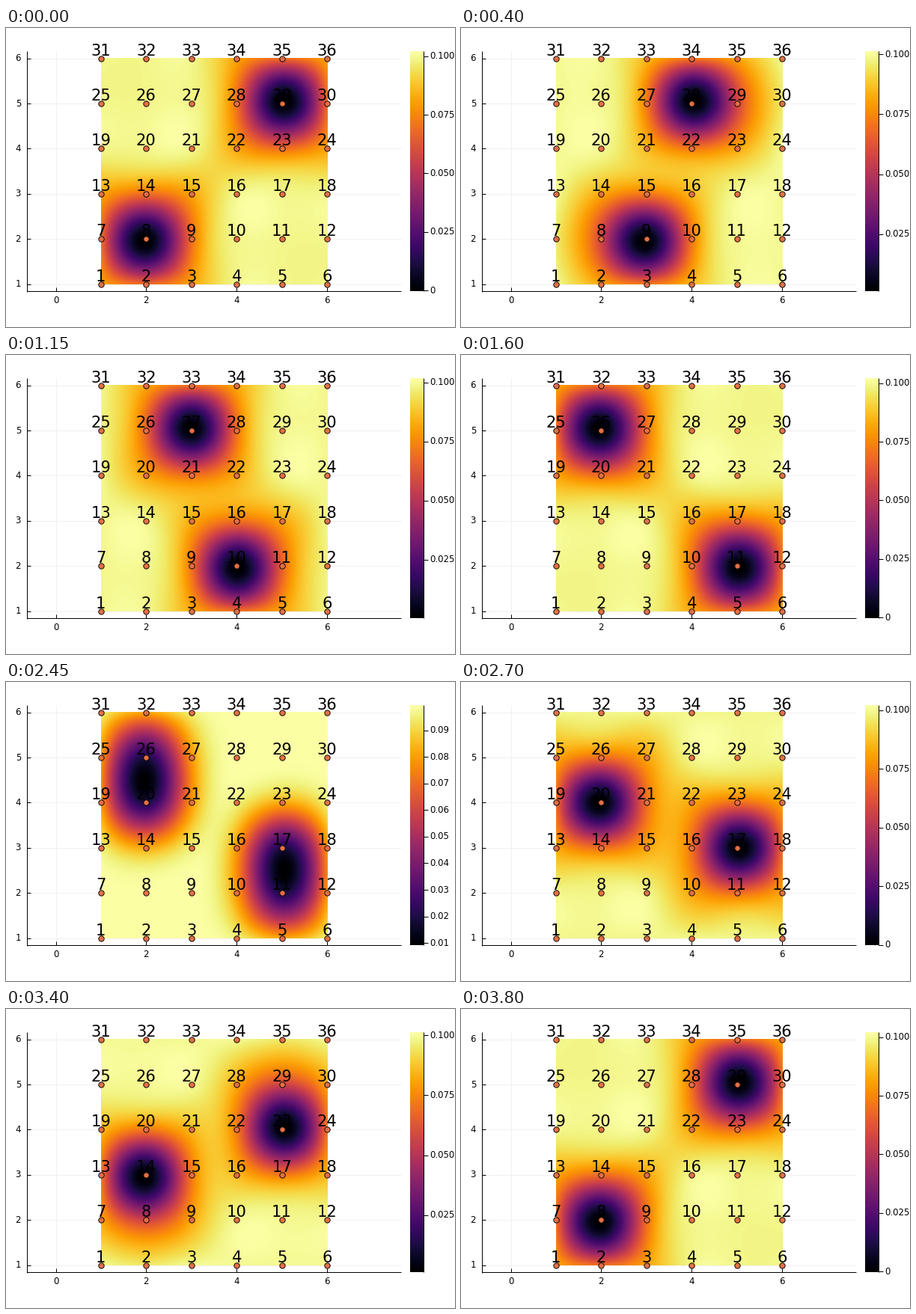
Animation of 600x400 px, one loop 3.85 s. Source, as a matplotlib script:

```python
import matplotlib.pyplot as plt
import numpy as np
from matplotlib.animation import FuncAnimation

W, H, DPI = 600, 400, 100
STEPS = 11                     # pictures per hop
N = 6                          # lattice sites per side
PATH_A = [8, 9, 10, 11, 11, 17, 23, 29]
PATH_B = [29, 28, 27, 26, 26, 20, 14, 8]
FRAMES = STEPS * (len(PATH_A) - 1)

BULK = 0.0993                  # density far away from the holes
HOLE = {0: 0.998, 1: 0.3, 2: 0.175}               # by squared distance
SHARED = {1: 0.15, 3: -0.035, 5: 0.02, 7: -0.05}  # by sum for both sites

X0, Y0, CELL = 66.5, 403.2, 60.43
TOP, BOTTOM = 31, 352
BAR = (540, 558)


def px(x):
    return X0 + CELL * x


def py(y):
    return Y0 - CELL * y


def spline_basis(n, count):
    """Matrix that evaluates a natural cubic spline through n knots."""
    left = np.eye(n)
    right = np.zeros((n, n))
    for i in range(1, n - 1):
        left[i, i - 1:i + 2] = 1, 4, 1
        right[i, i - 1:i + 2] = 6, -12, 6
    bend = np.linalg.solve(left, right)
    t = np.linspace(0, n - 1, count)
    k = np.minimum(t.astype(int), n - 2)
    b = (t - k)[:, None]
    a = 1 - b
    eye = np.eye(n)
    return (a * eye[k] + b * eye[k + 1]
            + ((a**3 - a) * bend[k] + (b**3 - b) * bend[k + 1]) / 6)


BASIS = spline_basis(N, 303)
ROWS, COLS = np.mgrid[0:N, 0:N]


def dist2(site):
    r, c = divmod(site - 1, N)
    return (ROWS - r)**2 + (COLS - c)**2


def lookup(table, keys):
    return np.vectorize(lambda k: table.get(int(k), 0.0), otypes=[float])(keys)


def depletion(start, end, s):
    u = s * s * (3 - 2 * s)
    d0, d1 = dist2(start), dist2(end)
    d = (1 - u) * lookup(HOLE, d0) + u * lookup(HOLE, d1)
    if start != end:
        d += 4 * u * (1 - u) * lookup(SHARED, d0 + d1)
    return d


def density(i):
    k, step = divmod(i, STEPS)
    s = step / (STEPS - 1)
    lost = sum(depletion(p[k], p[k + 1], s) for p in (PATH_A, PATH_B))
    return BASIS @ (BULK * (1 - lost)) @ BASIS.T


plt.rcParams["font.family"] = "DejaVu Sans"
fig = plt.figure(figsize=(W / DPI, H / DPI), dpi=DPI, facecolor="white")
ax = fig.add_axes([0, 0, 1, 1])
ax.axis("off")


def line(xs, ys, color="black", width=1.0, z=3):
    return ax.plot(xs, ys, color=color, lw=width * 72 / DPI, zorder=z,
                   solid_capstyle="butt")[0]


def label(x, y, text, size=11.8, ha="center", va="center"):
    return ax.text(x, y, text, fontsize=size * 72 / DPI, ha=ha, va=va,
                   color="black", zorder=6)


for v in (0, 2, 4, 6):
    line([px(v)] * 2, [TOP, BOTTOM], "#f0f0f0", 1, 0)
    line([px(v)] * 2, [BOTTOM, BOTTOM - 5])
    label(px(v), 364, str(v))
for v in range(1, 7):
    line([28, 528], [py(v)] * 2, "#f0f0f0", 1, 0)
    line([28, 33], [py(v)] * 2)
    label(20, py(v), str(v), ha="right")
line([28, 28], [TOP, BOTTOM + 0.5])
line([27.5, 528], [BOTTOM, BOTTOM])

heat = ax.imshow(np.zeros((2, 2)), cmap="inferno", origin="lower",
                 extent=(126.5, 429.5, 343, 40), aspect="auto",
                 interpolation="nearest", zorder=2)
ax.imshow(np.linspace(0, 1, 256)[:, None], cmap="inferno", origin="lower",
          extent=(*BAR, BOTTOM, TOP), aspect="auto", zorder=2)
line([BAR[1]] * 2, [TOP, BOTTOM])

for n in range(N * N):
    r, c = divmod(n, N)
    x, y = px(c + 1), py(r + 1)
    ax.plot(x, y, "o", ms=7.4 * 72 / DPI, mfc="#e26f46", mec="black",
            mew=0.9 * 72 / DPI, zorder=5)
    label(x, y - 4, str(n + 1), 21, va="baseline")

ticks = [(line([BAR[1], BAR[1] + 5.5], [0, 0]), label(566.5, 0, "", ha="left"))
         for _ in range(12)]

ax.set_xlim(0, W)
ax.set_ylim(H, 0)


def update(i):
    z = density(i)
    lo, hi = z.min(), z.max()
    heat.set_data(z)
    heat.set_clim(lo, hi)
    step, digits = (0.01, 2) if lo > 0.004 else (0.025, 3)
    first = int(np.ceil(lo / step))
    for j, (mark, text) in enumerate(ticks, first):
        v = j * step
        shown = v <= hi
        mark.set_visible(shown)
        text.set_visible(shown)
        y = BOTTOM - (v - lo) / (hi - lo) * (BOTTOM - TOP)
        mark.set_ydata([y, y])
        text.set_y(y)
        text.set_text(f"{v:.{digits}f}" if j else "0")
    return [heat]


anim = FuncAnimation(fig, update, frames=FRAMES, interval=50, repeat=True,
                     repeat_delay=0, blit=False)
plt.show()
```
